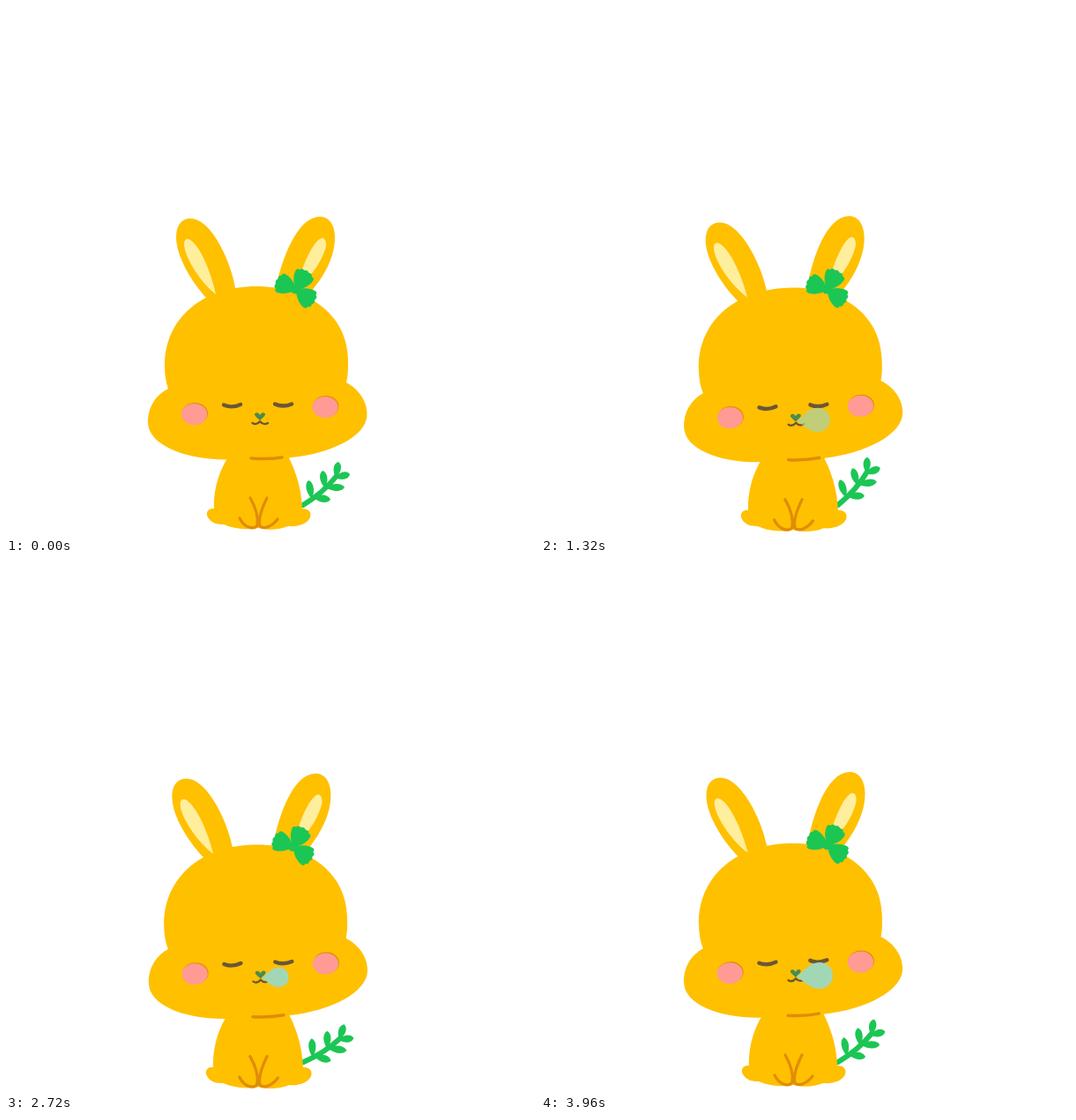
Write an HTML page with a canvas that moves like this. It is 600 by 600 pixels and loops after 4 s.

```html
<!DOCTYPE html>
<html lang="en">
<head>
<meta charset="utf-8">
<title>Sleepy bunny</title>
<style>
  html, body { margin: 0; width: 100%; height: 100%; overflow: hidden; background: #fff; }
  canvas { display: block; width: 100vmin; height: 100vmin; }
</style>
</head>
<body>
<canvas id="stage" width="600" height="600"></canvas>
<script>
const ctx = document.getElementById('stage').getContext('2d');
const LOOP = 4000, STEP = 40;
const FUR = '#ffc000', SHADE = '#e08c08', CREAM = '#ffee9c', GREEN = '#1cc654';
const BROWN = '#6b5638', BLUSH = '#ff9a94', BUBBLE = '#a2d7b6';

const shapes = {
  body: 'M257 505C243 522 235 547 236 570C229 569 226 575 229 580C233 587 240 588 247 588C260 594 278 594 286 592C298 595 310 594 320 590C332 591 342 587 345 580C347 574 343 570 336 570C335 545 328 525 317 505Z',
  legs: 'M277 558C285 572 286 582 285 589C282 594 271 593 265 581M296 558C289 572 286 582 288 590C293 594 302 590 308 582',
  head: 'M284 318C222 318 180 355 180 408C180 418 181 426 184 434C170 441 161 455 161 472C161 496 198 514 250 514.5C275 515 298 514 320 512.5C366 508.5 409.5 489 409.5 463C409.5 447 399 434 386 427C388 419 388 411 388 402C388 352 345 318 284 318Z',
  earL: 'M227 331C208 310 193 282 193 262C193 249 199 241 209 241C233 241 255 290 260 320L250 342Z',
  earR: 'M307 315C313 288 330 239 356 239C367 239 373 249 373 263C373 285 360 308 345 325L328 340Z',
  innerL: 'M238 327C222 315 202 285 202 270C202 264 206 263 210 266C221 274 233 303 238 327Z',
  innerR: 'M332 310C338 290 350 264 359 263C363 264 364 270 362 276C357 291 348 303 340 311Z',
  neck: 'M278 513Q297 514.5 313 512',
  eyes: 'M247 452.5Q256 456.5 266 452M305 451.5Q314 455.5 324 451.5',
  nose: 'M288 470C285 467 280.5 464 282.5 462C285 460 287 462 288 464C289 462 291 460 293.5 462C295.5 464 291 467 288 470Z',
  mouth: 'M279.5 473Q284 476 288 471.3Q292 476 297 473',
  clover: 'M0 0C5 -7 11 -11 18 -11.5Q21 -11 20.5 -8Q24 -7 22.5 -3Q25 0 22.5 3Q24 7 20.5 8Q21 11 18 11.5C11 11 5 7 0 0Z',
  stem: 'M337 566Q360 552 375 533',
  bubble: 'M0 -.06C.4 -.2 .8 -1 1.68 -1C2.23 -1 2.68 -.55 2.68 0C2.68 .55 2.23 1 1.68 1C.9 1 .5 .35 0 .1Z'
};
const paths = {};
for (const name in shapes) paths[name] = new Path2D(shapes[name]);

// base x, base y, tip x, tip y
const leaves = [
  [347, 559, 343, 538], [362, 547, 359, 527], [374, 535, 377, 517],
  [348, 557, 368, 560], [362, 546, 384, 546], [373, 535, 390, 531]
];

// time, head tilt in degrees
const tiltKeys = [
  [0, 0], [920, 1.2], [1680, 2.7], [2280, 2.7], [2720, 1.5],
  [3080, 1.05], [3400, 1.2], [4000, 1.83]
];

function smooth(keys, t) {
  let i = 0;
  while (i < keys.length - 2 && t >= keys[i + 1][0]) i++;
  const slope = j => {
    const a = keys[Math.max(j - 1, 0)], b = keys[Math.min(j + 1, keys.length - 1)];
    return (b[1] - a[1]) / (b[0] - a[0]);
  };
  const [t0, v0] = keys[i], [t1, v1] = keys[i + 1];
  const d = t1 - t0, u = (t - t0) / d, w = 1 - u;
  return v0 * w * w * (1 + 2 * u) + v1 * u * u * (3 - 2 * u) +
    d * u * w * (slope(i) * w - slope(i + 1) * u);
}

function fill(name, color) {
  ctx.fillStyle = color;
  ctx.fill(paths[name]);
}

function line(name, color, width) {
  ctx.strokeStyle = color;
  ctx.lineWidth = width;
  ctx.stroke(paths[name]);
}

function oval(x, y, rx, ry, color) {
  ctx.fillStyle = color;
  ctx.beginPath();
  ctx.ellipse(x, y, rx, ry, 0, 0, Math.PI * 2);
  ctx.fill();
}

function group(draw) {
  ctx.save();
  draw();
  ctx.restore();
}

function turn(x, y, degrees) {
  ctx.translate(x, y);
  ctx.rotate(degrees * Math.PI / 180);
  ctx.translate(-x, -y);
}

function drawLeaf([x, y, tx, ty]) {
  group(() => {
    const len = Math.hypot(tx - x, ty - y);
    ctx.translate(x, y);
    ctx.rotate(Math.atan2(ty - y, tx - x));
    ctx.fillStyle = GREEN;
    ctx.beginPath();
    ctx.moveTo(0, 0);
    ctx.bezierCurveTo(len * .4, -5.5, len * .85, -5.5, len, 0);
    ctx.bezierCurveTo(len * .85, 5.5, len * .4, 5.5, 0, 0);
    ctx.fill();
  });
}

function drawSprig(phase) {
  group(() => {
    turn(336, 566, -9 * Math.sin(phase));
    line('stem', GREEN, 6);
    leaves.forEach(drawLeaf);
  });
}

function drawBody(breath) {
  group(() => {
    const s = 1 + .025 * breath;
    ctx.translate(286, 470);
    ctx.scale(s, s);
    ctx.translate(-286, -470);
    fill('body', FUR);
    line('legs', SHADE, 3.2);
  });
}

function drawBubble(t) {
  group(() => {
    const r = 13 + 2 * Math.cos(2 * Math.PI * (t - 1750) / 2250);
    ctx.globalAlpha = Math.min(t / 2000, 1);
    ctx.translate(290, 469);
    ctx.scale(r, r);
    fill('bubble', BUBBLE);
  });
}

function drawHead(t, breath) {
  group(() => {
    ctx.translate(0, 2.4 * Math.pow(breath, 1.5));
    turn(286, 440, -smooth(tiltKeys, t));
    ['earL', 'earR', 'head'].forEach(name => fill(name, FUR));
    fill('innerL', CREAM);
    fill('innerR', CREAM);
    line('neck', SHADE, 3.5);
    for (const [x, y] of [[213.5, 463], [362, 455]]) {
      oval(x + .7, y - .9, 14.8, 12.2, SHADE);
      oval(x, y, 14.6, 12, BLUSH);
    }
    line('eyes', BROWN, 4.4);
    fill('nose', '#4c8b4c');
    line('mouth', BROWN, 2.3);
    for (const angle of [204, -60, 35]) {
      group(() => {
        ctx.translate(329, 322);
        ctx.rotate(angle * Math.PI / 180);
        ctx.scale(1.06, 1);
        fill('clover', GREEN);
      });
    }
    oval(328, 322, 4.5, 4.5, GREEN);
    drawBubble(t);
  });
}

function render(now) {
  const t = Math.floor(now % LOOP / STEP) * STEP;
  const phase = 2 * Math.PI * t / LOOP;
  const breath = (1 - Math.cos(phase)) / 2;
  ctx.fillStyle = '#fff';
  ctx.fillRect(0, 0, 600, 600);
  drawSprig(phase);
  drawBody(breath);
  drawHead(t, breath);
}

ctx.lineCap = ctx.lineJoin = 'round';
const start = performance.now();
function tick() {
  render(performance.now() - start);
  requestAnimationFrame(tick);
}
tick();
</script>
</body>
</html>
```
